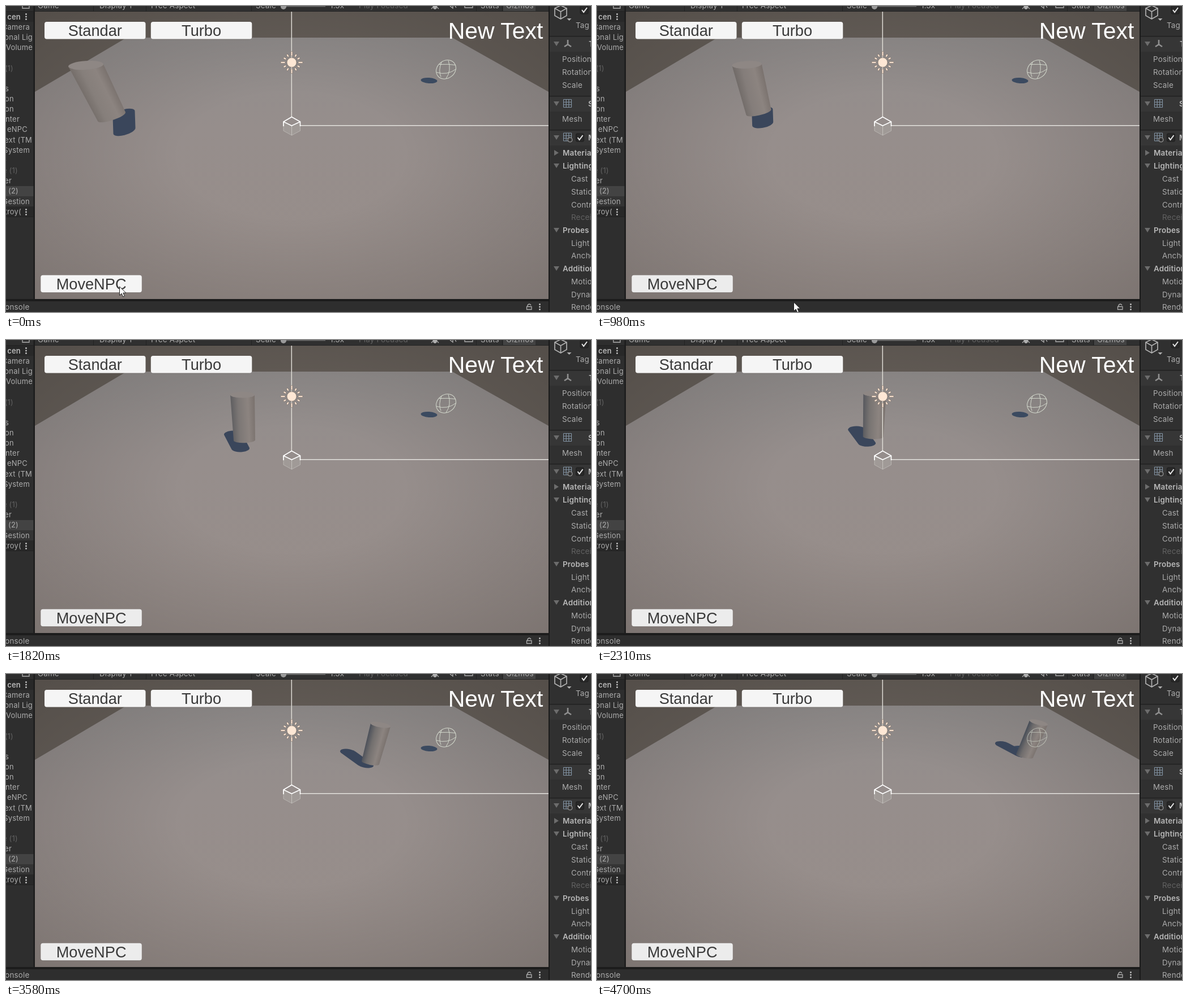
These frames come from a looping animation (1033 px wide and 542 px high, 5380 ms). An HTML page:

```html
<!DOCTYPE html>
<html lang="en">
<head>
<meta charset="utf-8">
<title>Moving cylinder</title>
<style>
html, body { margin: 0; width: 100%; height: 100%; overflow: hidden; background: #1c1c1c; }
svg { display: block; width: 1033px; height: 542px; }
text { font: 13.4px Inter, sans-serif; letter-spacing: .2px; fill: #acacac; white-space: pre; }
.b { font-weight: 600; fill: #b8b8b8; }
.dim { fill: #626262; }
.ui { font: 27.2px "Liberation Sans", Arial, sans-serif; letter-spacing: 0; fill: #3a3a3a; text-anchor: middle; }
.title { font: 41px "Liberation Sans", Arial, sans-serif; letter-spacing: 0; fill: #fff; text-anchor: end; }
.wire { fill: none; stroke: #d3d8cc; stroke-width: 1; }
.icon { fill: none; stroke: #b0b0b0; stroke-width: 1.3; }
</style>
</head>
<body>
<svg id="stage" viewBox="0 0 1033 542"></svg>
<script>
const stage = document.getElementById('stage');
const rect = (x, y, w, h, fill, more = '') =>
  `<rect x="${x}" y="${y}" width="${w}" height="${h}" fill="${fill}" ${more}/>`;
const path = (d, more) => `<path d="${d}" ${more}/>`;
const text = (x, y, s, cls = '', more = '') => `<text x="${x}" y="${y}" class="${cls}" ${more}>${s}</text>`;
const dots = (x, y) => [-4.5, 0, 4.5].map(d => `<circle cx="${x}" cy="${y + d}" r="1.4" fill="#c4c4c4"/>`).join('');
const fold = (x, y, open = true) =>
  path(open ? `M${x - 5} ${y - 4}h10l-5 8z` : `M${x - 4} ${y - 5}v10l8-5z`, 'fill="#6c6c6c"');
const check = (x, y) => rect(x - 7, y - 7, 14, 14, '#282828', 'rx="2" stroke="#1c1c1c"') +
  path(`M${x - 4} ${y}l3 4 6-8`, 'fill="none" stroke="#e6e6e6" stroke-width="2"');
const grid = (x, y) => [-7, -2.3, 2.3, 7].map(d =>
  path(`M${x + d} ${y - 7}v14M${x - 7} ${y + d}h14`, 'stroke="#8495a5" stroke-width="1.1"')).join('');
const button = (x, y, s, id) =>
  rect(x, y + 1, 178.5, 30.5, '#5d5754', 'rx="5" opacity=".4"') +
  rect(x, y, 178.5, 30.5, '#f5f5f5', `rx="4" id="${id}"`) + text(x + 89.3, y + 25, s, 'ui');

function scene() {
  const rays = Array.from({ length: 12 }, (_, i) =>
    rect(-1.4, i % 3 ? -16.5 : -19.5, 2.8, i % 3 ? 5 : 8, '#fde7d5', `rx="1" transform="rotate(${i * 30})"`)).join('');
  return `<defs>
    <linearGradient id="floor" x2="0" y2="1">
      <stop stop-color="#918d8c"/><stop offset=".35" stop-color="#968e8c"/><stop offset="1" stop-color="#978d89"/>
    </linearGradient>
    <radialGradient id="vignette" r=".72">
      <stop offset=".3" stop-opacity="0"/><stop offset="1" stop-opacity=".18"/>
    </radialGradient>
    <linearGradient id="side" gradientUnits="userSpaceOnUse">
      <stop id="edge"/><stop id="inner" offset=".3"/>
      <stop offset=".72" stop-color="#8c8480"/><stop offset="1" stop-color="#7b736f"/>
    </linearGradient>
    <clipPath id="view">${rect(51, 10, 907, 509, '#000')}</clipPath>
    <clipPath id="list">${rect(0, 10, 47, 365, '#000')}</clipPath>
  </defs>
  <g clip-path="url(#view)">
    ${rect(51, 10, 907, 509, '#665f59')}
    ${path('M213 56H788L958 152V519H51V152z', 'fill="url(#floor)"')}
    ${rect(51, 10, 907, 509, 'url(#vignette)')}
    <ellipse cx="747" cy="132" rx="14.5" ry="5" fill="#3b4a60" transform="rotate(4 747 132)"/>
    <line id="shadow" stroke="#3a465b" stroke-linecap="round"/>
    <path id="body" fill="url(#side)"/><path id="cap" fill="#8e8784"/>
    <g id="ball" class="wire" transform="translate(777 112.5)">
      <ellipse rx="18.5" ry="15.5" transform="rotate(-38)"/>
      <path d="M4-16Q10 2 0 16M-17 5Q2 11 18-1M-8-13Q-14 2-9 13M-12-9Q4-10 16-8"/>
    </g>
    ${path('M504.3 10V197', 'stroke="#dedbd5" stroke-width="1.5"')}
    ${path('M519 211.700H958', 'stroke="#e4e2de" stroke-width="1.6"')}
    <g transform="translate(504.5 100)" fill="#fde7d5" stroke="#6f645c" stroke-width=".6">${rays}<circle r="8.5"/></g>
    ${path('M490 205L504.5 212 519.5 205V221L504.5 229 490 221z', 'fill="#aaa5a2" fill-opacity=".5" stroke="#b8b4b0"')}
    ${path('M504.5 212V229', 'stroke="#c4c0bc"')}
    ${path('M490 213V205L504.5 196.5 519.5 205V213M490 205L504.5 212 519.5 205', 'fill="none" stroke="#fff" stroke-width="1.7"')}
    ${button(68, 28, 'Standar', 'standard')}${button(255.8, 28, 'Turbo', 'turbo')}
    ${button(61.3, 476.7, 'MoveNPC', 'move')}
    ${text(948.5, 58, 'New Text', 'title')}
  </g>`;
}

function toolbar() {
  const labels = [[56, 'Game'], [165, 'Display 1'], [256, 'Free Aspect'], [441, 'Scale'],
    [572, '1.3x'], [623, 'Play Focused', 'dim'], [838, 'Stats'], [883, 'Gizmos']];
  return rect(51, 0, 907, 10, '#303030') + rect(878, 0, 57, 9, '#434343') +
    labels.map(([x, s, c]) => text(x, 4, s, c)).join('') +
    [154, 247, 433, 830, 876].map(x => rect(x, 0, 1, 9, '#222')).join('') +
    rect(487, 0, 77, 1.5, '#696969') + '<circle cx="490" cy="1" r="5" fill="#9b9b9b"/>' +
    path('M751 5l3-3m10 3l-3-3', 'class="icon"') + '<ellipse cx="757.5" cy="0" rx="4" ry="6" fill="#b0b0b0"/>' +
    path('M784 0l5 4V0m4 0l2 3', 'class="icon"') + path('M810 0v3h14V0', 'class="icon"') +
    rect(51, 9, 907, 1, '#242424');
}

function hierarchy() {
  const rows = [[26, 0, 'cen', 'b'], [42, 1, 'Camera'], [47, 2, 'onal Lig'], [47, 3, 'Volume'], [13, 5, '(1)', 'dim'],
    [5, 7, 's'], [14, 8, 'on'], [14, 9, 'on'], [24, 10, 'nter'], [38, 11, 'eNPC'], [46, 12, 'ext (TM'],
    [42, 13, 'System'], [1, 14, 'e'], [21, 15, 'e (1)', 'dim'], [10, 16, 'er'], [22, 17, 'e (2)'],
    [42, 18, 'Gestion'], [27, 19, 'troy(']];
  return rect(0, 0, 49, 520, '#2e2e2e') + rect(0, 10, 49, 18, '#282828') +
    rect(0, 319, 49, 18, '#434343') + rect(0, 337, 49, 18, '#343434') + rect(0, 355, 49, 18, '#282828') +
    rect(0, 9, 49, 1, '#222') + rect(0, 373, 49, 1, '#222') +
    path('M29 0v4h12V0', 'class="icon"') + dots(35.5, 19) + dots(35.5, 365) +
    `<g clip-path="url(#list)" text-anchor="end">` +
    rows.map(([x, n, s, c]) => text(x, 23.8 + n * 18.15, s, c, 'style="font-size:13px"')).join('') + '</g>';
}

function inspector() {
  const rows = [[1006, 39, 'Tag'], [1029, 72, 'Transform', 'b'], [982, 99, 'Position'], [982, 122, 'Rotation'],
    [982, 145, 'Scale'], [1028, 178, 'Shape', 'b'], [982, 205, 'Mesh'], [1028, 238, 'Mesh', 'b'],
    [983, 265, 'Materials', 'b'], [983, 288, 'Lighting', 'b'], [998, 311, 'Cast'], [998, 334, 'Static'],
    [998, 357, 'Contribute'], [998, 379, 'Receive', 'dim'], [983, 402, 'Probes', 'b'], [998, 425, 'Light'],
    [998, 447, 'Anchor'], [983, 470, 'Additional', 'b'], [998, 493, 'Motion'], [998, 516, 'Dynamic'], [998, 538, 'Rendering']];
  const heads = [53, 159, 219].map(y => rect(960, y, 73, 28, '#363636') + rect(960, y, 73, 1.5, '#202020')).join('');
  return rect(960, 0, 73, 542, '#303030') + heads +
    path('M969 4L979.5-1 990 4V17L979.5 23 969 17zM969 4L979.5 10 990 4M979.5 10V23', 'class="icon" style="stroke-width:1.7"') +
    path('M990.5 22h8l-4 4z', 'fill="#b0b0b0"') + check(1021, 7) + check(1013.5, 233) +
    path('M992 60v8l-6 4m6-4l6 4', 'class="icon" style="stroke:#909090;stroke-width:2.6"') +
    grid(991.5, 172.5) + grid(991.5, 232) +
    '<circle cx="996" cy="237" r="4" fill="#323232" stroke="#aaa"/>' +
    [67, 173, 233, 283, 397, 465].map(y => fold(972, y)).join('') + fold(972, 260, false) +
    rows.map(([x, y, s, c]) => text(x, y, s, c)).join('');
}

const footer = rect(0, 519, 960, 4, '#1c1c1c') + rect(0, 523, 958, 19, '#2e2e2e') +
  text(41.5, 538, 'onsole', '', 'text-anchor="end"') +
  path('M921 532v-2q3-4 6 0M919.5 532.5h8.500v5h-8.500z', 'class="icon"') + dots(942.5, 533);

const cursor = path('M0 0V15.5L3.6 12.2 6.2 18 8.8 16.8 6.3 11.2H11.3z', 'id="cursor" fill="#fff" stroke="#222"');

stage.innerHTML = scene() + toolbar() + hierarchy() + rect(48.5, 0, 2.5, 520, '#1c1c1c') +
  footer + rect(958, 0, 2, 542, '#1a1a1a') + inspector() + cursor;

// step, top left, top right, bottom left, bottom right, near shadow, far shadow, shadow radius, shade
const poses = [
  [3, 110, 107, 172, 103, 162, 204, 211, 188, 209, 221, 208, 191, 19.5, 0],
  [9, 172, 109, 229, 105, 206, 199, 254, 187, 246, 215, 245, 187, 19, .05],
  [18, 293, 102, 342, 100, 312, 188, 353, 180, 333, 203, 331, 184, 18, .15],
  [26, 396, 97, 439, 97, 402, 178, 440, 177, 414, 192, 401, 167, 16, .45],
  [41, 550, 92, 588, 95, 543, 163, 577, 165, 546, 172, 524, 151, 15.5, .8],
  [51, 644, 87, 679, 93, 628, 154, 659, 160, 634, 160, 605, 139, 15, .9],
  [67, 764, 82, 796, 90, 740, 142, 770, 148, 749, 142, 717, 125, 14, 1]];

// Smooth curve through the poses
function poseAt(step) {
  const last = poses.length - 1;
  const s = Math.max(poses[0][0], Math.min(poses[last][0], step));
  let i = 0;
  while (i < last - 1 && poses[i + 1][0] <= s) i++;
  const a = poses[i], b = poses[i + 1], span = b[0] - a[0], u = (s - a[0]) / span;
  const slope = (n, j) => {
    const p = poses[Math.max(0, n - 1)], q = poses[Math.min(last, n + 1)];
    return (q[j] - p[j]) / (q[0] - p[0]) * span;
  };
  return a.map((v, j) => {
    const d = b[j] - v, m = slope(i, j), n = slope(i + 1, j);
    return v + u * (m + u * (3 * d - 2 * m - n + u * (m + n - 2 * d)));
  });
}

const set = (id, attrs) => {
  const el = document.getElementById(id);
  for (const name in attrs) el.setAttribute(name, attrs[name]);
};
const mix = (a, b, u) => `rgb(${a.map((v, i) => Math.round(v + (b[i] - v) * u))})`;
const arc = (x1, y1, x2, y2, sweep) => {
  const r = Math.hypot(x2 - x1, y2 - y1) / 2, tilt = Math.atan2(y2 - y1, x2 - x1) * 180 / Math.PI;
  return `A${r} ${r * .25} ${tilt} 0 ${sweep} ${x2} ${y2}`;
};

function draw(step) {
  const [, ax, ay, bx, by, cx, cy, dx, dy, nx, ny, fx, fy, r, shade] = poseAt(step);

  // The shadow leans with the bottom rim
  const lean = .75 * (dy - cy) / (dx - cx), flat = .4;
  set('shadow', {
    transform: `matrix(1 ${lean} 0 ${flat} ${nx} ${ny})`,
    x2: fx - nx, y2: (fy - ny - lean * (fx - nx)) / flat, 'stroke-width': 2 * r
  });
  set('body', { d: `M${ax} ${ay}${arc(ax, ay, bx, by, 0)}L${dx} ${dy}${arc(dx, dy, cx, cy, 1)}z` });
  set('cap', { d: `M${ax} ${ay}${arc(ax, ay, bx, by, 1)}${arc(bx, by, ax, ay, 1)}z` });

  // Shading runs across the axis
  const vx = cx + dx - ax - bx, vy = cy + dy - ay - by, len = Math.hypot(vx, vy);
  const px = vy / len, py = -vx / len;
  const mx = (ax + bx + cx + dx) / 4, my = (ay + by + cy + dy) / 4;
  const half = ((bx - ax + dx - cx) * px + (by - ay + dy - cy) * py) / 4;
  set('side', { x1: mx - px * half, y1: my - py * half, x2: mx + px * half, y2: my + py * half });
  set('edge', { 'stop-color': mix([118, 111, 107], [72, 78, 88], shade) });
  set('inner', { 'stop-color': mix([134, 127, 123], [112, 109, 109], shade) });
  set('ball', { opacity: step > 63 ? .65 : 1 });

  const level = [245, 222, 200, 200, 220][step] || 236;
  set('move', { fill: `rgb(${level},${level},${level})` });
  const go = Math.max(0, Math.min(1, (step - 11) / 4));
  set('cursor', {
    transform: `translate(${200.5 + 196 * go} ${497 + 37 * go})`,
    visibility: step < 16 ? 'visible' : 'hidden'
  });
}

function tick(now) {
  draw(Math.min(67, Math.floor((now % 5380 + 10) / 70)));
  requestAnimationFrame(tick);
}
draw(0);
requestAnimationFrame(tick);
</script>
</body>
</html>
```
